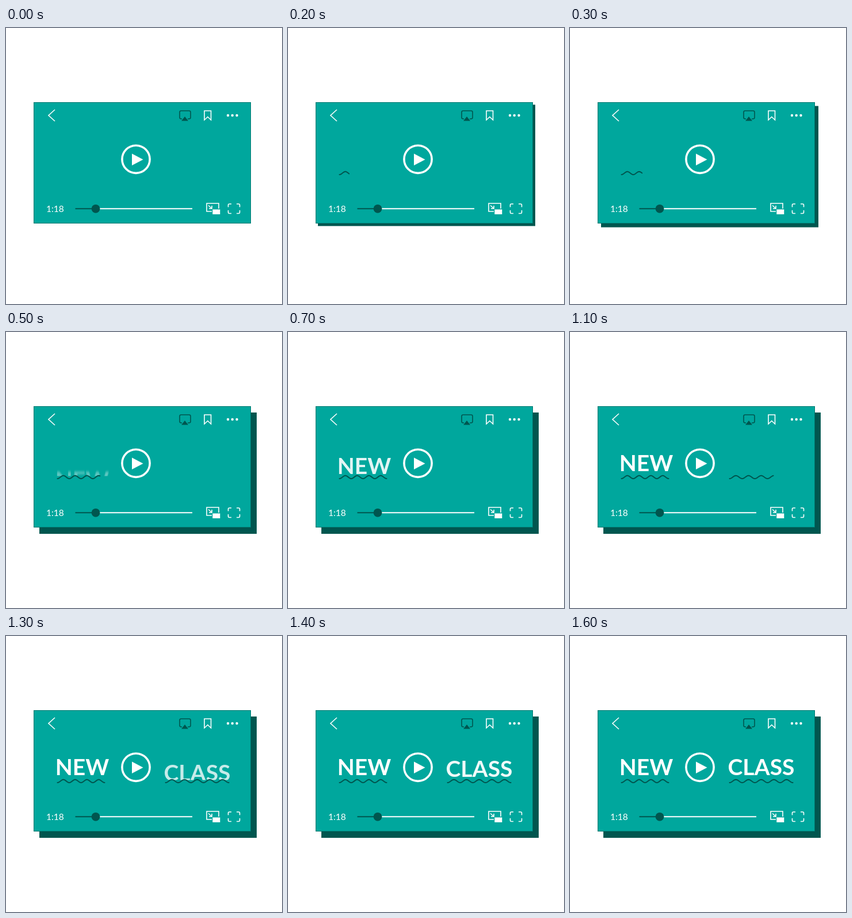
These frames come from a looping animation (480 px wide and 480 px high, 3500 ms). An HTML page:

```html
<!DOCTYPE html>
<html lang="en">
<head>
<meta charset="utf-8">
<title>New class player</title>
<style>
  html, body { margin: 0; width: 100%; height: 100%; overflow: hidden; background: #fff; }
  svg { display: block; width: 100vw; height: 100vh; }
  text { font-family: Lato, sans-serif; fill: #fff; }
  .word { font-size: 39px; font-weight: 700; }
  .line { fill: none; stroke: #fff; stroke-width: 1.6; }
  .dark { stroke: #00564f; }
  .fill { fill: #fff; }
  .ink { fill: #00564f; }
  .wave { stroke-width: 2; stroke-linecap: round; stroke-linejoin: round; }
</style>
</head>
<body>
<svg viewBox="0 0 480 480">
  <defs>
    <clipPath id="above"><rect x="48" y="129" width="378" height="121.5"/></clipPath>
    <filter id="smear" filterUnits="userSpaceOnUse" x="48" y="160" width="378" height="180">
      <feGaussianBlur id="blur" stdDeviation="0 1"/>
    </filter>
  </defs>

  <rect id="shadow" class="ink" x="48" y="129" width="378" height="211"/>
  <rect x="48" y="129" width="378" height="211" fill="#00a79d"/>
  <rect x="48.5" y="129.5" width="377" height="210" fill="none" stroke="#00776f"/>

  <path class="line" d="M85 142L74 152L85 162"/>

  <path class="line dark" d="M306 158H304.5Q302 158 302 155.500V146.500Q302 144 304.500 144H318.500Q321 144 321 146.500V155.500Q321 158 318.500 158H316"/>
  <path class="ink" d="M305 161.500L311 154L317 161.500Z"/>

  <path class="line" d="M345 144H356.500V160L350.750 154.500L345 160Z"/>
  <g class="fill">
    <circle cx="386" cy="152" r="2.2"/>
    <circle cx="393.700" cy="152" r="2.2"/>
    <circle cx="401.500" cy="152" r="2.2"/>
  </g>

  <circle cx="226" cy="228.300" r="24.100" fill="none" stroke="#fff" stroke-width="3.6"/>
  <path class="fill" d="M219 218.500L238.500 228.700L219 239Z"/>

  <text x="70" y="320" font-size="15.5">1:18</text>
  <path class="line" style="stroke-width:2" d="M156 314.300H324"/>
  <path class="line dark" style="stroke-width:2" d="M120.500 314.300H156"/>
  <circle class="ink" cx="156" cy="314.300" r="7.400"/>

  <path class="line" d="M358 319H349V305H370V314"/>
  <rect class="fill" x="359.300" y="315.500" width="13" height="8.500"/>
  <path class="line" d="M352 308.500L357.500 313.500M358 309V314H353"/>
  <path class="line" d="M386.500 311.500V308Q386.500 306 388.500 306H392M401 306H404.500Q406.500 306 406.500 308V311.500M406.500 317V320.500Q406.500 322.500 404.500 322.500H401M392 322.500H388.500Q386.500 322.500 386.500 320.500V317"/>

  <g clip-path="url(#above)">
    <text id="newWord" class="word" x="85.700" y="242">NEW</text>
    <text id="classWord" class="word" x="274.500" y="242">CLASS</text>
  </g>
  <path id="newWave" class="line dark wave"/>
  <path id="classWave" class="line dark wave"/>
</svg>
<script>
  const LOOP = 3500, STEP = 100, DRAW = 431;
  const byId = id => document.getElementById(id);
  const clamp = (v, lo, hi) => Math.min(hi, Math.max(lo, v));
  const blur = byId('blur');

  const parts = [
    { word: byId('newWord'), wave: byId('newWave'), x: 89.5, width: 82, humps: 4, start: 112, settle: 850 },
    { word: byId('classWord'), wave: byId('classWave'), x: 277.5, width: 110, humps: 5, start: 802, settle: 1510 }
  ];

  function wavePath(part, progress) {
    if (progress <= 0) return '';
    const end = part.width * progress;
    const count = Math.ceil(end);
    let d = '';
    for (let i = 0; i <= count; i++) {
      const x = end * i / count;
      const y = 252.4 + 2.6 * Math.cos(2 * Math.PI * part.humps * x / part.width);
      d += (i ? 'L' : 'M') + (part.x + x).toFixed(2) + ' ' + y.toFixed(2);
    }
    return d;
  }

  function drawPart(part, t) {
    part.wave.setAttribute('d', wavePath(part, clamp((t - part.start) / DRAW, 0, 1)));

    // The word decelerates upward from behind its underline.
    const left = Math.max(0, (part.settle - t) / 100);
    const drop = 2.35 * left * left;
    part.word.setAttribute('transform', `translate(0 ${drop.toFixed(2)})`);
    part.word.setAttribute('opacity', clamp(1 - drop / 46, 0, 1));
    const moving = drop > 7 && drop < 46;
    if (moving) blur.setAttribute('stdDeviation', `0 ${(drop * 0.07).toFixed(2)}`);
    part.word.setAttribute('filter', moving ? 'url(#smear)' : 'none');
  }

  function render(now) {
    const t = Math.floor((now % LOOP) / STEP) * STEP;
    const shift = clamp(t / 500, 0, 1);
    byId('shadow').setAttribute('transform', `translate(${10 * shift} ${11 * shift})`);
    parts.forEach(part => drawPart(part, t));
  }

  const begin = performance.now();
  function tick() {
    render(performance.now() - begin);
    requestAnimationFrame(tick);
  }
  tick();
</script>
</body>
</html>
```
